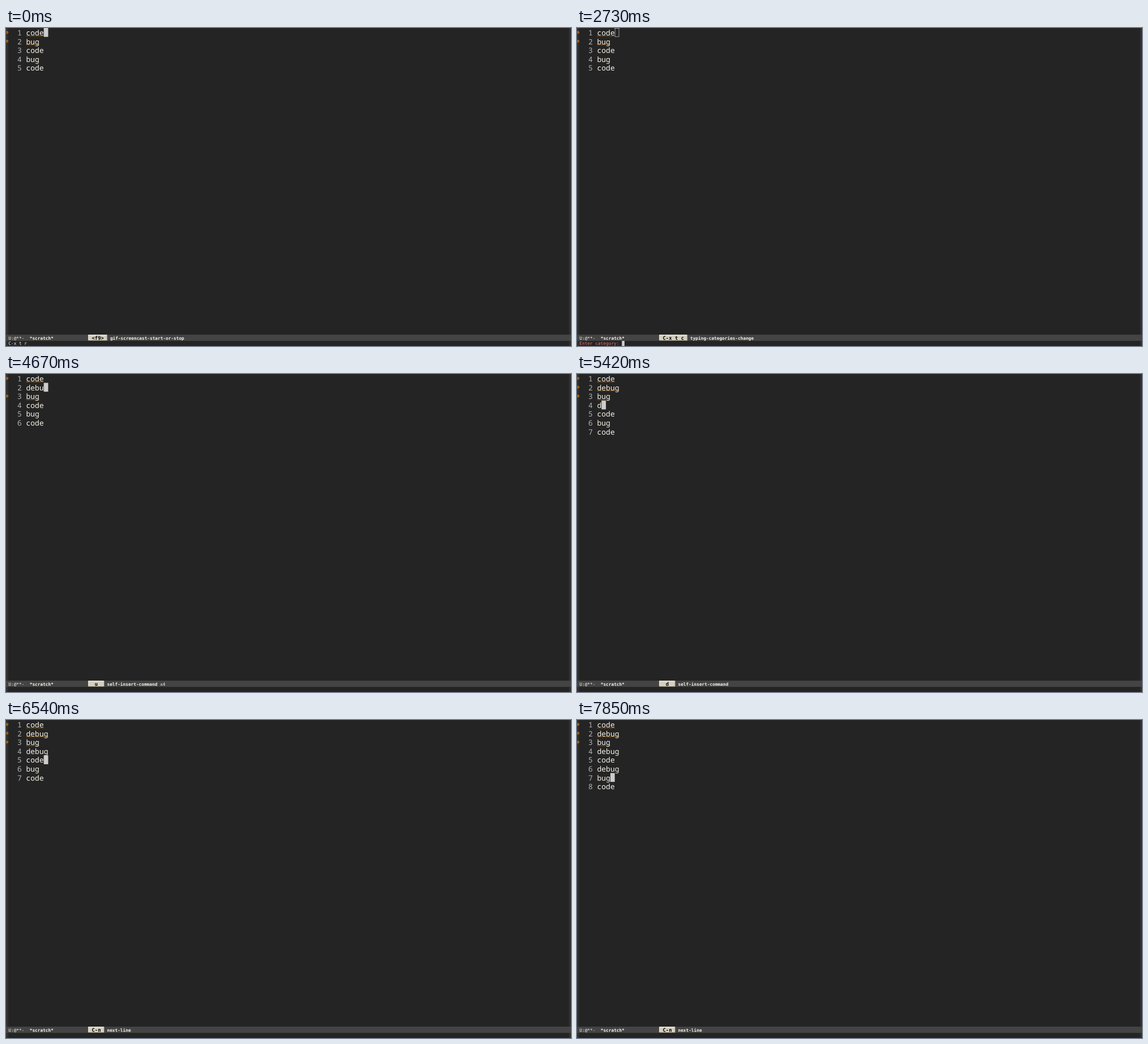
An HTML page for the animation above (8000 ms loop, 998x561 px).

```html
<!DOCTYPE html>
<html lang="en">
<head>
<meta charset="utf-8">
<title>Editor session</title>
<style>
  html, body { margin: 0; width: 100%; height: 100%; overflow: hidden; background: #242424; }
  svg { display: block; width: 100%; height: 100%; }
  text { white-space: pre; text-rendering: geometricPrecision; }
  .buf { font: 13px "Noto Sans Mono", "DejaVu Sans Mono", monospace; }
  .bar { font: 7.78px "DejaVu Sans Mono", monospace; }
  .key { font: bold 8.94px "DejaVu Sans Mono", monospace; }
  .b { font-weight: bold; }
</style>
</head>
<body>
<svg id="stage" viewBox="0 0 998 561"></svg>
<script>
const LOOP = 8000;
const LEFT = 4.3, CELL = 7.8, ROW = 15.6, TEXT_X = LEFT + 4 * CELL;
const SMALL = 4.684, KEY = 5.382, BAR_Y = 541;
const FG = '#f6f3e8', RED = '#e5786d', ORANGE = '#ff8c00', CURSOR = '#cccccc';
const DOC = 'List of errors for which the debugger should not be called.';
const CANDIDATES = ['-ignored-errors', '-on-error', '-on-event', '-on-message', '-on-next-call',
  '-on-quit', '-on-signal', 'ger', 'ger-may-continue', 'ger-stack-frame-as-list'];

const insert = 'self-insert-command';
const typeWord = (...times) => times.map((at, i) => ({
  at, key: 'debug'[i], cmd: insert, type: 'debug'[i], count: i + 1, popup: i === 4, echo: i === 4 ? DOC : ''
}));
const next = at => ({ at, key: 'C-n', cmd: 'next-line', down: true });
const newline = (at, check) => ({ at, key: 'RET', cmd: 'newline', split: true, check });

const steps = [
  { at: 0, key: '<f9>', cmd: 'gif-screencast-start-or-stop', echo: 'C-x t r' },
  { at: 1000, key: 'C-x t r', cmd: 'typing-categories-reset', echo: 'C-x t c' },
  { at: 2730, key: 'C-x t c', cmd: 'typing-categories-change', prompt: 'Enter category: ', hollow: true },
  { at: 3350, key: 'd', cmd: insert, hollow: true },
  { at: 3850, key: 'RET', cmd: 'exit-minibuffer' },
  newline(4180),
  ...typeWord(4320, 4440, 4560, 4670, 4730),
  next(5000),
  newline(5230, 1),
  ...typeWord(5420, 5570, 5810, 5980, 6060),
  next(6540),
  newline(6800),
  ...typeWord(6950, 7090, 7210, 7310, 7380),
  next(7850)
];

// Replays the edits up to and including step n.
function bufferAt(n) {
  const lines = ['code', 'bug', 'code', 'bug', 'code'].map((s, i) => ({ s, warn: i < 2 }));
  let row = 0, col = 4;
  for (const step of steps.slice(0, n + 1)) {
    if (step.split) { lines.splice(++row, 0, { s: '', warn: false }); col = 0; }
    if (step.type) { lines[row].s += step.type; col++; }
    if (step.down) col = Math.min(col, lines[++row].s.length);
    if (step.check) lines[step.check].warn = true;
  }
  return { lines, row, col };
}

const esc = s => s.replace(/&/g, '&amp;').replace(/</g, '&lt;').replace(/>/g, '&gt;');
const rect = (x, y, w, h, fill) => `<rect x="${x}" y="${y}" width="${w}" height="${h}" fill="${fill}"/>`;
const text = (x, y, s, cls, fill = FG) => `<text x="${x}" y="${y}" class="${cls}" fill="${fill}">${esc(s)}</text>`;
const baseline = row => row * ROW + 12.9;

function warning(row) {
  const y = row * ROW + 5.4;
  const chevron = x => `M${x} ${y}l1.7 2.3l-1.7 2.3`;
  return `<path d="${chevron(0.2)}${chevron(2.1)}" fill="none" stroke="${ORANGE}" stroke-width="1"/>`;
}

function underline(row, length) {
  let d = `M${TEXT_X} ${row * ROW + 14.5}`;
  for (let i = 0; i < length * 5; i++) d += `l${CELL / 5} ${i % 2 ? 0.9 : -0.9}`;
  return `<path d="${d}" fill="none" stroke="${ORANGE}" stroke-width=".6" opacity=".85"/>`;
}

function drawBuffer(step, { lines, row, col }) {
  let out = '';
  lines.forEach((line, i) => {
    const covered = step.popup && i > row;
    if (!step.popup || i <= row + 1) out += text(LEFT + 2 * CELL, baseline(i), String(i + 1), 'buf', '#b3b3b3');
    if (line.warn) out += warning(i);
    if (line.warn && !covered) out += underline(i, line.s.length);
    out += text(TEXT_X, baseline(i), line.s, 'buf');
  });
  const x = TEXT_X + col * CELL, y = row * ROW;
  out += step.hollow
    ? `<rect x="${x + .4}" y="${y + .4}" width="7" height="14.8" fill="none" stroke="${CURSOR}" stroke-width=".7"/>`
    : rect(x, y, CELL, ROW, CURSOR);
  return out;
}

function drawPopup(row) {
  const x = TEXT_X + 5 * CELL;
  return rect(x, (row + 1) * ROW, 42 * CELL, CANDIDATES.length * ROW, '#292929') +
    CANDIDATES.map((rest, i) => {
      const y = baseline(row + 1 + i);
      return text(x + CELL, y, 'debug', 'buf', RED) +
        text(x + 6 * CELL, y, rest, 'buf', i ? FG : '#10e584');
    }).join('');
}

function drawBar(step) {
  const x = 145.2, size = Math.max(3, step.key.length) + 2, w = size * KEY + 1.7;
  const pad = (size - step.key.length) / 2 * KEY + .85;
  const cmdX = x + w + SMALL;
  return rect(0, BAR_Y, 998, 10.9, '#444444') +
    text(LEFT, 549.6, 'U:@**-', 'bar') +
    text(LEFT + 8 * SMALL, 549.6, '*scratch*', 'bar b') +
    rect(x, BAR_Y, w, 10.7, '#817c6f') +
    rect(x, BAR_Y, w - 1.1, 9.6, '#f4eedf') +
    rect(x + 1.1, BAR_Y + 1.1, w - 2.2, 8.5, '#d5cfbf') +
    text(x + pad, 549.8, step.key, 'key', '#000') +
    text(cmdX, 549.6, step.cmd, 'bar b') +
    (step.count > 1 ? text(cmdX + (step.cmd.length + 1) * SMALL, 549.6, 'x' + step.count, 'bar') : '');
}

function drawEcho({ prompt, echo }) {
  if (prompt) {
    return text(LEFT, 559.3, prompt, 'bar', RED) +
      rect(LEFT + prompt.length * SMALL, 552, SMALL, 9, CURSOR);
  }
  return echo ? text(LEFT, 559.3, echo, 'bar') : '';
}

const stage = document.getElementById('stage');
let shown = -1;

function render(t) {
  const n = steps.filter(s => s.at <= t).length - 1;
  if (n === shown) return;
  shown = n;
  const step = steps[n], buffer = bufferAt(n);
  stage.innerHTML = rect(0, 0, 998, 561, '#242424') +
    rect(0, 0, 4, 561, '#303030') + rect(994.5, 0, 3.5, 561, '#303030') +
    drawBuffer(step, buffer) +
    (step.popup ? drawPopup(buffer.row) : '') +
    drawBar(step) + drawEcho(step);
}

const start = performance.now();
function tick() {
  render((performance.now() - start) % LOOP);
  requestAnimationFrame(tick);
}
tick();
</script>
</body>
</html>
```
